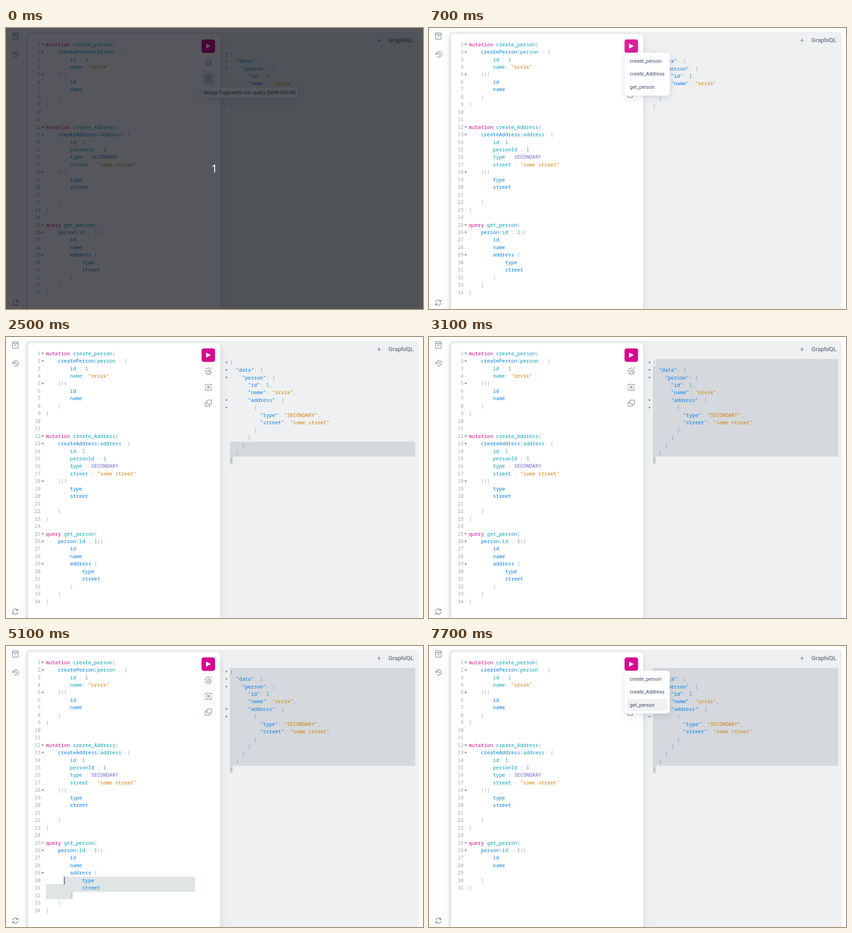
Write an HTML page with a canvas that moves like this. It is 911x615 px and loops after 8 s.

```html
<!DOCTYPE html>
<html lang="en">
<head>
<meta charset="utf-8">
<title>Query editor</title>
<style>
html, body { margin: 0; width: 100%; height: 100%; overflow: hidden; background: #fff; }
canvas { display: block; }
</style>
</head>
<body>
<canvas id="stage" width="911" height="615"></canvas>
<script>
const ctx = document.getElementById('stage').getContext('2d');
const LOOP = 8000, ROW = 16.4545, COL = 6.6;
const MONO = '11px "Noto Sans Mono", "DejaVu Sans Mono", monospace';
const SANS = '11px Roboto, sans-serif';
const INK = '#3b4b68', ICON = '#6b7689', FAINT = 'rgba(59,75,104,.45)';
const PINK = '#d60690', PINK_HOVER = '#da1f9b';

const CODE = `mutation create_person{
    createPerson(person : {
        id : 1
        name: "orvik"
    }){
        id
        name
    }
}


mutation create_Address{
    createAddress(address: {
        id: 1
        personId : 1
        type : SECONDARY
        street : "some street"
    }){
        type
        street

    }
}

query get_person{
    person(id : 1){
        id
        name
        address {
            type
            street
        }
    }
}`.split('\n');
const TRIMMED = [...CODE.slice(0, 28), '', ...CODE.slice(32)];

const SHORT = JSON.stringify({ data: { person: { id: 1, name: 'orvik' } } }, null, 2).split('\n');
const FULL = JSON.stringify({
  data: { person: { id: 1, name: 'orvik', address: [{ type: 'SECONDARY', street: 'some street' }] } }
}, null, 2).split('\n');

const TOKEN = /(?<field>"[^"]*"(?=:))|(?<string>"[^"]*")|(?<keyword>\b(?:mutation|query)\b)|(?<def>(?<=(?:mutation|query) )\w+|\b[a-z]\w*(?=\s*:))|(?<enum>\b[A-Z]{2,}\b)|(?<number>\d+)|(?<name>\w+)|(?<mark>\S)/g;
const COLORS = {
  field: '#007deb', name: '#007deb', string: '#d17e00', keyword: PINK,
  def: '#009fb8', enum: '#6a66ce', number: '#2bab7c', mark: FAINT
};

const left = { x: 87, y: 27.6, right: 413, end: [32, 9], fill: '#dfe4e4' };
const right = { x: 489, y: 47.6, right: 894, end: [14, 1], fill: '#d5d8dd' };

// Each entry: time, then the values that hold from that time on.
const TIPS = [
  [0, 'Merge fragments into query (Shift-Ctrl-M)', 130],
  [200, 'Prettify query (Shift-Ctrl-P)', 95],
  [300, '', 0],
  [400, 'Execute query (Ctrl-Enter)', 60],
  [700, '', 0]
];
const TOOL_HOVER = [[0, 95], [200, 60], [300, 0], [6800, 95], [6900, 0]];
const PLAY = [[0, ''], [300, 'hover'], [900, ''], [1700, 'focus'], [2400, ''], [7100, 'hover'], [7500, '']];
const MENU = [[0, null], [700, -1], [900, 0], [1000, 1], [1200, 2], [1700, null], [7300, -1], [7500, 1], [7700, 2]];
const RESULT_SEL = [[0, 0, 0], [2500, 12, 0], [2600, 8, 2], [2700, 4, 1], [3000, 2, 1], [3100, 1, 1], [3200, 1, 0]];
const CODE_SEL = [[0, 0, 0], [4900, 32, 7], [5000, 31, 7], [5100, 30, 6], [5200, 29, 3], [5300, 29, 0], [6200, 0, 0]];
const CARET = [[0, 0, 0], [4200, 19, 12], [4800, 32, 9], [4900, 32, 7], [5000, 31, 7], [5100, 30, 6],
  [5200, 29, 3], [5300, 29, 0], [5800, 0, 0], [6200, 29, 0], [6800, 0, 0]];
const BAR = [[0, 0], [3200, .15], [3300, .3], [3500, .2], [3600, .1], [3700, 0]];

const at = (track, t) => track.findLast(step => step[0] <= t).slice(1);

function box(x, y, w, h, r, fill) {
  ctx.fillStyle = fill;
  ctx.beginPath();
  ctx.roundRect(x, y, w, h, r);
  ctx.fill();
}

function raised(x, y, w, h, r) {
  ctx.save();
  for (const [dy, blur, a] of [[5, 16.5, .13], [1.1, 3.7, .08], [.3, 1.1, .05]]) {
    ctx.shadowColor = `rgba(59,76,106,${a})`;
    ctx.shadowOffsetY = dy;
    ctx.shadowBlur = blur;
    box(x, y, w, h, r, '#fff');
  }
  ctx.restore();
}

function label(text, x, y, font = SANS, fill = INK, align = 'left') {
  ctx.font = font;
  ctx.fillStyle = fill;
  ctx.textAlign = align;
  ctx.fillText(text, x, y);
}

function icon(x, y, d, width = 1.1) {
  ctx.save();
  ctx.translate(x, y);
  ctx.strokeStyle = ICON;
  ctx.lineWidth = width;
  ctx.lineCap = ctx.lineJoin = 'round';
  ctx.stroke(new Path2D(d));
  ctx.restore();
}

const rowTop = (pane, row) => pane.y + (row - 1) * ROW;

function drawLines(pane, lines) {
  lines.forEach((line, i) => {
    const y = Math.round(rowTop(pane, i + 1) + 12);
    for (const m of line.matchAll(TOKEN)) {
      const kind = Object.keys(m.groups).find(k => m.groups[k]);
      label(m[0], pane.x + m.index * COL, y, MONO, COLORS[kind]);
    }
  });
}

function drawSelection(pane, [row, col]) {
  if (!row) return;
  const [lastRow, lastCol] = pane.end;
  ctx.fillStyle = pane.fill;
  for (let r = row; r <= lastRow; r++) {
    const x = pane.x + (r === row ? col * COL : 0);
    const x2 = r === lastRow ? pane.x + lastCol * COL : pane.right;
    const y = Math.round(rowTop(pane, r));
    ctx.fillRect(x, y, x2 - x, Math.round(rowTop(pane, r + 1)) - y);
  }
}

function drawFolds(pane, x, rows) {
  ctx.fillStyle = '#7f8a9b';
  for (const r of rows) {
    const y = rowTop(pane, r) + ROW / 2;
    ctx.beginPath();
    ctx.moveTo(x - 2.6, y - 1.6);
    ctx.lineTo(x + 2.6, y - 1.6);
    ctx.lineTo(x, y + 2.6);
    ctx.fill();
  }
}

function drawFrame() {
  ctx.fillStyle = '#fefefe';
  ctx.fillRect(0, 0, 911, 615);
  box(43, 8, 859, 630, 10, '#eff0f1');
  raised(48, 13.5, 420, 630, 8);

  icon(20.5, 17.5, 'M-5-7h10q1 0 1 1v12q0 1-1 1h-10q-1 0-1-1v-12q0-1 1-1zM-6-3.4h12M-2 .4h4');
  icon(21.3, 57.8, 'M-5.6-1A5.8 5.8 0 1 1-3.7 4.4M-7.3-1.6l1.9 2 2.2-1.8M0-3.3v3.5l2.6 1.4');
  icon(20.3, 601, 'M-5.7-.8A5.8 5.8 0 0 1 5-3M5.6-5.8v3.2h-3.2M5.7.8A5.8 5.8 0 0 1-5 3M-5.6 5.8v-3.2h3.2');
  icon(815, 27, 'M-3.7 0h7.4M0-3.7v7.4', 1.2);

  const medium = '500 13.2px Roboto, sans-serif';
  let x = 835.5;
  for (const [part, font] of [['Graph', medium], ['i', 'italic ' + medium], ['QL', medium]]) {
    label(part, x, 31, font, ICON);
    x += ctx.measureText(part).width;
  }
}

function drawTools(t) {
  const [hover] = at(TOOL_HOVER, t);
  if (hover) box(427.3, hover, 29.4, 29.4, 4, '#edeff0');

  const [state] = at(PLAY, t);
  const grow = state === 'focus' ? .8 : 0;
  box(427.2 - grow, 24.9 - grow, 29.5 + 2 * grow, 29.5 + 2 * grow, 5, state === 'hover' ? PINK_HOVER : PINK);
  ctx.fillStyle = '#fff';
  ctx.fill(new Path2D('M437 34.2L447.6 39.6L437 45.2Z'));

  icon(442, 75, 'M8-8L3.2-2M-1.5-1.5L6 3.5M-1.5-1.5Q-3 2.5-6.5 3.5Q-4 6.5 2.5 7Q5.5 6 6 3.5M0-1.5Q1-4 4-1.7Q7 .5 6 3.5M-2.5 5Q-1 4 0 2.5M1 6.5Q2.5 5 3 3.5M-3.5-7.5v3M-5-6h3M-6.5-2.5v2.4M-7.7-1.3h2.4M1-8v2M0-7h2', 1);
  icon(442, 110, 'M-7-3.5v-2q0-1 1-1h12q1 0 1 1v2M-7 3.5v2q0 1 1 1h12q1 0 1-1v-2M-7 0h2.4M7 0h-2.4M-2.7-3L0-.5 2.7-3M-2.7 3L0 .5 2.7 3');
  icon(442, 145, 'M-2-7h8q1 0 1 1v7q0 1-1 1h-8q-1 0-1-1v-7q0-1 1-1zM-3-2.5h-3q-1 0-1 1v7.5q0 1 1 1h7.5q1 0 1-1v-4');
}

function drawMenu(t) {
  const [active] = at(MENU, t);
  if (active === null) return;
  raised(427.3, 54.3, 98.5, 93.5, 6);
  ['create_person', 'create_Address', 'get_person'].forEach((name, i) => {
    const y = 59.8 + i * 28.2;
    if (i === active) box(432.8, y, 87.4, 26, 4, '#f0f1f2');
    label(name, 438.5, Math.round(y + 16.4));
  });
}

function drawTip(t) {
  const [text, y] = at(TIPS, t);
  if (!text) return;
  ctx.font = SANS;
  raised(427.2, y + .3, ctx.measureText(text).width + 8.8, 22.6, 4);
  label(text, 431.6, y + 15);
}

function drawEditor(t) {
  const lines = t < 6200 ? CODE : TRIMMED;
  drawSelection(left, at(CODE_SEL, t));
  lines.forEach((_, i) => label(i + 1, 75.6, Math.round(rowTop(left, i + 1) + 12), MONO, 'rgba(59,75,104,.5)', 'right'));
  const folds = [1, 2, 5, 12, 13, 18, 25, 26];
  if (t < 6600) folds.push(29);
  drawFolds(left, 80.1, folds);
  drawLines(left, lines);

  const [row, col] = at(CARET, t);
  if (row) {
    ctx.fillStyle = INK;
    ctx.fillRect(left.x + col * COL, Math.round(rowTop(left, row)), 1.6, 17);
  }
}

function drawResult(t) {
  drawSelection(right, at(RESULT_SEL, t));
  drawLines(right, t < 1700 ? SHORT : FULL);
  if (t < 1700) drawFolds(right, 481.6, [1, 2, 3]);
  else if (t >= 2000) drawFolds(right, 481.6, [1, 2, 3, 6, 7]);

  const [alpha] = at(BAR, t);
  if (alpha) box(471.4, 287, 2.2, 163, 1, `rgba(59,75,104,${alpha})`);
}

function draw(t) {
  drawFrame();
  drawEditor(t);
  drawResult(t);
  drawTools(t);
  drawMenu(t);
  drawTip(t);
  if (t < 100) {
    ctx.fillStyle = 'rgba(2,5,13,.67)';
    ctx.fillRect(0, 0, 911, 615);
    label('1', 455, 316, '24px "Noto Sans", sans-serif', '#fff', 'center');
  }
}

const start = performance.now();
function tick() {
  draw((performance.now() - start) % LOOP);
  requestAnimationFrame(tick);
}
tick();
</script>
</body>
</html>
```
